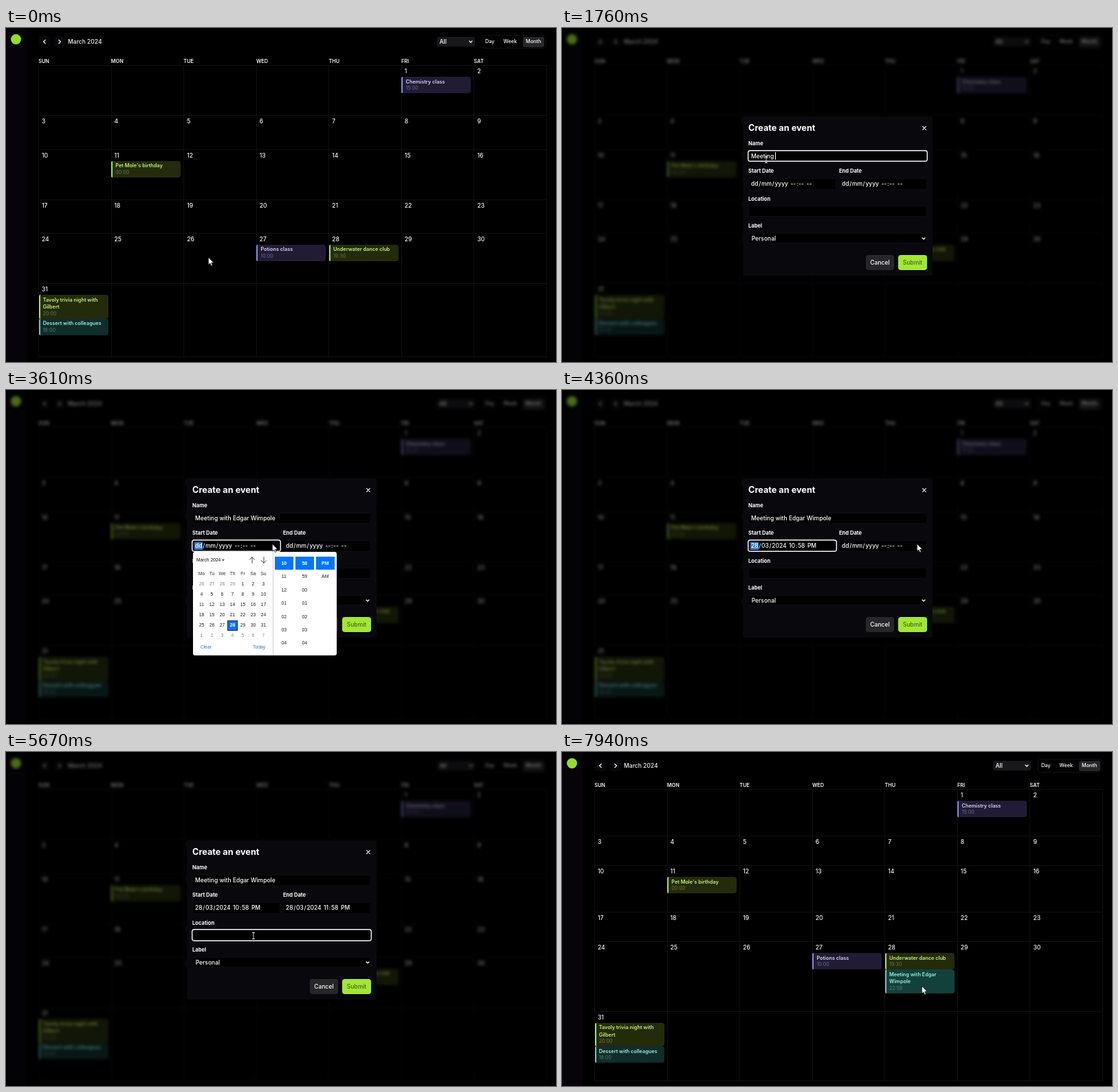
Recreate the animation shown at these times as an HTML page. Size 800x487 px, loop 8910 ms.

```html
<!DOCTYPE html>
<html lang="en">
<head>
<meta charset="utf-8">
<title>Calendar</title>
<style>
html, body { margin: 0; width: 100%; height: 100%; overflow: hidden; background: #000; }
#stage { position: relative; width: 800px; height: 487px; overflow: hidden; background: #000; font-family: Inter, sans-serif; }
#stage div, #stage svg { position: absolute; box-sizing: border-box; }
#stage .text { line-height: 0; white-space: pre; }
.input { background: #000; border: 1px solid #0d0c11; border-radius: 3px; }
.ring { box-shadow: inset 0 0 0 1.4px #f4f4f5; border-radius: 4px; }
.caret { position: absolute; top: -5.5px; width: 1px; height: 11px; background: #fff; }
.seg { display: inline-block; line-height: 11px; padding: 0 .61px; }
.seg.on { background: #3880cd; }
#picker { background: #fff; border-radius: 3px; overflow: hidden; font-family: "Liberation Sans", Arial, sans-serif; }
#picker .list { overflow: hidden; }
svg { fill: none; overflow: visible; }
</style>
</head>
<body>
<div id="stage"></div>
<script>
const LOOP = 8910;
const NAME = 'Meeting with Edgar Wimpole';
const PLACE = 'Springfield';
const stage = document.getElementById('stage');

function box(parent, x, y, w, h, style = '', cls = '') {
  const el = document.createElement('div');
  el.className = cls;
  el.style.cssText = `left:${x}px;top:${y}px;width:${w}px;height:${h}px;${style}`;
  parent.append(el);
  return el;
}

// y is the vertical centre of the capitals
function text(parent, str, x, y, size, weight = 400, color = '#fff', centred = false) {
  const el = document.createElement('div');
  el.className = 'text';
  el.textContent = str;
  el.style.cssText = `left:${x}px;top:${y}px;font-size:${size}px;font-weight:${weight};color:${color};` +
    (centred ? 'transform:translateX(-50%)' : '');
  parent.append(el);
  return el;
}

function icon(parent, x, y, d, color = '#fff', width = 1.2, fill = 'none') {
  const holder = document.createElement('div');
  holder.style.cssText = `left:${x}px;top:${y}px`;
  holder.innerHTML = `<svg width="1" height="1"><path d="${d}" stroke="${color}" stroke-width="${width}" fill="${fill}" stroke-linejoin="round" stroke-linecap="round"/></svg>`;
  parent.append(holder);
  return holder;
}

const show = (el, on) => { el.style.visibility = on ? 'visible' : 'hidden'; };
const CHEVRON = 'M-2 -1L0 1L2 -1';

/* calendar */
const LINE = 'background:#101013';
const COLORS = {
  violet: { bg: '#211c34', bar: '#8189e2', ink: '#d8d2fb', dim: '#6f6a86' },
  lime: { bg: '#242b0b', bar: '#a3e635', ink: '#c8f472', dim: '#6f7653' },
  teal: { bg: '#0f2d2a', bar: '#5fc9b4', ink: '#9af2e0', dim: '#5a7d78' }
};
const colX = i => 47 + i * 105.57;

function card(parent, col, top, kind, lines, time, bg) {
  const c = COLORS[kind], h = 24 + (lines.length - 1) * 10.4;
  const el = box(parent, colX(col) + .5, top, 101, h,
    `background:${bg || c.bg};border-left:2.6px solid ${c.bar};border-radius:2px 4px 4px 2px`);
  lines.forEach((s, i) => text(el, s, 4.2, 7.5 + i * 10.7, 7.32, 600, c.ink));
  text(el, time, 4.2, h - 6.8, 7.1, 400, c.dim);
  return top + h;
}

function month(parent, rows, added) {
  const el = box(parent, 0, 0, 800, 487);
  for (let i = 0; i < 8; i++) box(el, colX(i), 54, 1, 425.5, LINE);
  rows.forEach(y => box(el, 47, y, 739.5, 1, LINE));
  for (let d = 1; d <= 31; d++) {
    const n = d + 4;
    text(el, d, colX(n % 7) + 5, rows[n / 7 | 0] + 9, 8.54, 500, '#f4f4f5');
  }
  const at = r => rows[r] + 17.3;
  card(el, 5, at(0), 'violet', ['Chemistry class'], '15:00');
  card(el, 1, at(2), 'lime', ["Pet Mole's birthday"], '00:00');
  card(el, 3, at(4), 'violet', ['Potions class'], '10:00');
  const below = card(el, 4, at(4), 'lime', ['Underwater dance club'], '19:30');
  if (added) card(el, 4, below, 'teal', ['Meeting with Edgar', 'Wimpole'], '22:58', '#12413c');
  const next = card(el, 0, at(5), 'lime', ['Tavoly trivia night with', 'Gilbert'], '20:00');
  card(el, 0, next, 'teal', ['Dessert with colleagues'], '18:00');
  return el;
}

const calendar = box(stage, 0, 0, 800, 487, 'background:#000');
box(calendar, 0, 0, 30, 487, 'background:#060309');
box(calendar, 7, 9, 15, 15, 'border-radius:50%;background:#93dc2c');
[55.5, 78].forEach((x, i) => {
  box(calendar, x - 8, 12, 16, 16, 'background:#08080a;border-radius:3px');
  icon(calendar, x, 20, i ? 'M-1.2 -2.6L1.4 0L-1.2 2.6' : 'M1.2 -2.6L-1.4 0L1.2 2.6');
});
text(calendar, 'March 2024', 90, 20, 8.54, 500, '#f4f4f5');
box(calendar, 627, 13, 54.5, 14, 'background:#18181b;border-radius:3px');
text(calendar, 'All', 630.5, 20, 8.54, 500);
icon(calendar, 676, 20, CHEVRON);
box(calendar, 691.5, 10, 94.5, 20, 'border:1px solid #121214;border-radius:4px');
box(calendar, 752, 12.5, 31, 15, 'background:#27272a;border-radius:3px');
[['Day', 697], ['Week', 723.5], ['Month', 756]].forEach(([s, x]) => text(calendar, s, x, 20, 7.32, 500));
['SUN', 'MON', 'TUE', 'WED', 'THU', 'FRI', 'SAT'].forEach((s, i) => text(calendar, s, colX(i) + .2, 48.5, 7.32, 600, '#f4f4f5'));
const before = month(calendar, [54, 126.5, 176.5, 249.5, 298.5, 372, 479]);
const after = month(calendar, [54, 121.5, 165, 232.5, 276, 377.5, 479], true);

/* dialog */
const dialog = box(stage, 0, 0, 800, 487, 'transform-origin:400.5px 245px');
box(dialog, 262.5, 129, 276.5, 231.5, 'background:#09080d;border-radius:3px');
text(dialog, 'Create an event', 271, 146, 12.7, 700);
icon(dialog, 526.5, 146.3, 'M-2.3 -2.3L2.3 2.3M2.3 -2.3L-2.3 2.3');
[['Name', 271, 168.7], ['Start Date', 271, 208.7], ['End Date', 403, 208.7], ['Location', 271, 249.5], ['Label', 271, 289]]
  .forEach(([s, x, y]) => text(dialog, s, x, y, 7.6, 700));

function input(x, y, w, h) {
  box(dialog, x, y, w, h, '', 'input');
  return box(dialog, x - .8, y - .8, w + 1.6, h + 1.6, '', 'ring');
}
const rings = {
  name: input(271, 178.5, 260, 16.2),
  start: input(271, 218.5, 128, 17),
  end: input(403, 218.5, 128, 17),
  place: input(271, 259, 260, 16.2)
};
box(dialog, 271, 299, 260, 15.2, '', 'input');

const INPUT_SIZE = 8.5;
const nameText = text(dialog, '', 275, 186.8, INPUT_SIZE, 500);
const placeText = text(dialog, '', 275, 267.2, INPUT_SIZE, 500);
const labelText = text(dialog, '', 275.7, 306.7, INPUT_SIZE, 500);
icon(dialog, 526, 306.5, CHEVRON);

function type(field, value, caret) {
  field.textContent = value;
  if (!caret) return;
  const el = document.createElement('span');
  el.className = 'caret';
  field.append(el);
}

function dateField(x) {
  const el = text(dialog, '', x, 221.5, INPUT_SIZE, 500);
  el.style.lineHeight = '11px';
  const segs = ['/', '/', ' ', ':', ' ', ''].map(sep => {
    const s = document.createElement('span');
    s.className = 'seg';
    el.append(s, sep);
    return s;
  });
  return (value, focused) => {
    value.split(' ').forEach((v, i) => { segs[i].textContent = v; });
    segs[0].classList.toggle('on', focused);
  };
}
const setStart = dateField(274.4), setEnd = dateField(406.4);
const EMPTY = 'dd mm yyyy -- -- --';

function button(s, x, w, bg, ink) {
  const el = box(dialog, x, 331, w, 21.5, `background:${bg};border-radius:4px`);
  text(el, s, w / 2, 10.9, 8.54, 500, ink, true);
}
button('Cancel', 442, 41, '#27272a', '#fff');
button('Submit', 489, 42, '#a3e635', '#48661a');

/* label options */
const options = box(stage, 271, 313, 260, 35, 'background:#000;border:1px solid #5c5c61');
const LABELS = ['Personal', 'Work', 'University'];
const optionBar = box(options, 0, 0, 258, 11, 'background:#1967d2');
LABELS.forEach((s, i) => text(options, s, 3.8, 5.8 + i * 11.1, INPUT_SIZE, 500));

/* date picker */
const picker = box(stage, 271.5, 236, 209.5, 150.5);
picker.id = 'picker';
box(picker, 116, 0, 1, 151, 'background:#cfcfd4');
text(picker, 'March 2024', 5.5, 11.7, 6.7, 400, '#111');
icon(picker, 44.2, 11.5, 'M-1.6 -.8L1.6 -.8L0 1.1Z', '#222', .3, '#222');
icon(picker, 86, 12, 'M0 4.3V-4.3M-3.6 -.7L0 -4.3L3.6 -.7', '#333', .9);
icon(picker, 103, 12, 'M0 -4.3V4.3M-3.6 .7L0 4.3L3.6 .7', '#333', .9);
['Mo', 'Tu', 'We', 'Th', 'Fr', 'Sa', 'Su'].forEach((s, i) => text(picker, s, 13 + i * 15, 31.6, 6.8, 400, '#333', true));
box(picker, 50.5, 99.5, 15, 15, 'background:#0075ff;border:1px solid #123');
for (let i = 0; i < 42; i++) {
  const d = i < 4 ? 26 + i : i < 35 ? i - 3 : i - 34;
  const today = i === 31, outside = i < 4 || i > 34;
  text(picker, d, 13 + (i % 7) * 15, 47 + (i / 7 | 0) * 15, 6.8, today ? 700 : 400,
    today ? '#fff' : outside ? '#888' : '#222', true);
}
text(picker, 'Clear', 11.2, 139, 6.8, 400, '#2f76c8');
text(picker, 'Today', 87.5, 139, 6.8, 400, '#2f76c8');

const two = n => String(n).padStart(2, '0');
function timeList(x, items) {
  const view = box(picker, x, 6, 28, 142, '', 'list');
  const strip = box(view, 0, 0, 28, 200);
  const bar = box(strip, 0, 1.3, 27.5, 19.2, 'background:#0075ff');
  const labels = items.map((s, i) => text(strip, s, 13.8, 11 + i * 19.4, 7, 400, '#222', true));
  return (index, scroll) => {
    bar.style.top = 1.3 + index * 19.4 + 'px';
    strip.style.top = -scroll * 19.4 + 'px';
    labels.forEach((el, i) => {
      el.style.color = i === index ? '#fff' : '#222';
      el.style.fontWeight = i === index ? 700 : 400;
    });
  };
}
const setHour = timeList(119, [10, 11, 12, 1, 2, 3, 4, 5].map(two));
timeList(149, [58, 59, 0, 1, 2, 3, 4].map(two))(0, 0);
timeList(179, ['PM', 'AM'])(0, 0);

/* pointer */
const arrow = icon(stage, 0, 0, 'M-.6 -.4V10L1.9 7.9L3.5 11.7L5.3 10.9L3.7 7.2H7Z', '#111', .7, '#fff');
const beam = icon(stage, 0, 0, 'M-1.6 -4.5H1.6M0 -4.5V4.5M-1.6 4.5H1.6', '#e8e8e8', .9);
const PATH = [
  [0, 294.5, 335], [300, 294.5, 335], [830, 297, 192], [3070, 297, 192], [3500, 388, 225], [3680, 388, 225],
  [3930, 330, 342], [4010, 330, 342], [4330, 516.5, 225], [4480, 516.5, 225], [4720, 461, 342], [4780, 461, 342],
  [4940, 535, 271], [5040, 535, 271], [5330, 360, 268], [6500, 360, 268], [6800, 345, 306], [6900, 345, 306],
  [7120, 346, 328.5], [7430, 346, 328.5], [7640, 523.5, 341.5], [LOOP, 523.5, 341.5]
];

const within = (t, a, b) => t >= a && t < b;
const ramp = (t, a, b) => Math.min(1, Math.max(0, (t - a) / (b - a)));
const smooth = p => p * p * (3 - 2 * p);

function pointerAt(t) {
  const i = PATH.findIndex(p => p[0] > t);
  const [t0, x0, y0] = PATH[i - 1], [t1, x1, y1] = PATH[i];
  const p = smooth(ramp(t, t0, t1));
  return [x0 + (x1 - x0) * p, y0 + (y1 - y0) * p];
}

function draw(t) {
  const [px, py] = pointerAt(t);
  const isBeam = within(t, 730, 3140) || within(t, 5290, 6560);
  for (const el of [arrow, beam]) {
    el.style.left = px + 'px';
    el.style.top = py + 'px';
  }
  show(arrow, !isBeam);
  show(beam, isBeam);

  const k = smooth(ramp(t, 50, 260)) * (1 - smooth(ramp(t, 7690, 7900)));
  const saved = t >= 7690;
  show(before, !saved);
  show(after, saved);
  calendar.style.filter = k ? `blur(${2 * k}px) brightness(${1 - .5 * k})` : 'none';
  dialog.style.opacity = k;
  dialog.style.transform = k < 1 ? `scale(${.95 + .05 * k})` : 'none';
  dialog.style.display = k ? 'block' : 'none';

  const focus = t < 3540 ? 'name' : t < 4430 ? 'start' : t < 5370 ? 'end' : t < 6820 ? 'place' : '';
  for (const id in rings) rings[id].style.display = id === focus ? 'block' : 'none';

  const typed = Math.round(8 * ramp(t, 940, 1740) + 18 * ramp(t, 1820, 2870));
  type(nameText, NAME.slice(0, typed), focus === 'name' && (within(t, 260, 700) || within(t, 900, 3060)));
  type(placeText, PLACE.slice(0, Math.round(11 * ramp(t, 5920, 6500))), focus === 'place' && t >= 5700);

  setStart(t < 3960 ? EMPTY : '28 03 2024 10 58 PM', focus === 'start');
  setEnd(t < 4740 ? EMPTY : `28 03 2024 ${t < 4970 ? 10 : 11} 58 PM`, focus === 'end');
  labelText.textContent = LABELS[t < 7190 ? 0 : 1];

  show(picker, within(t, 3550, 4340) || within(t, 4440, 5370));
  picker.style.left = (t < 4400 ? 271.5 : 403.5) + 'px';
  setHour(t < 4970 ? 0 : 1, smooth(ramp(t, 4970, 5130)));

  show(options, within(t, 6840, 7190));
  optionBar.style.top = (py < 325 ? 0 : 11) + 'px';
}

function tick() {
  draw(performance.now() % LOOP);
  requestAnimationFrame(tick);
}
tick();
</script>
</body>
</html>
```
